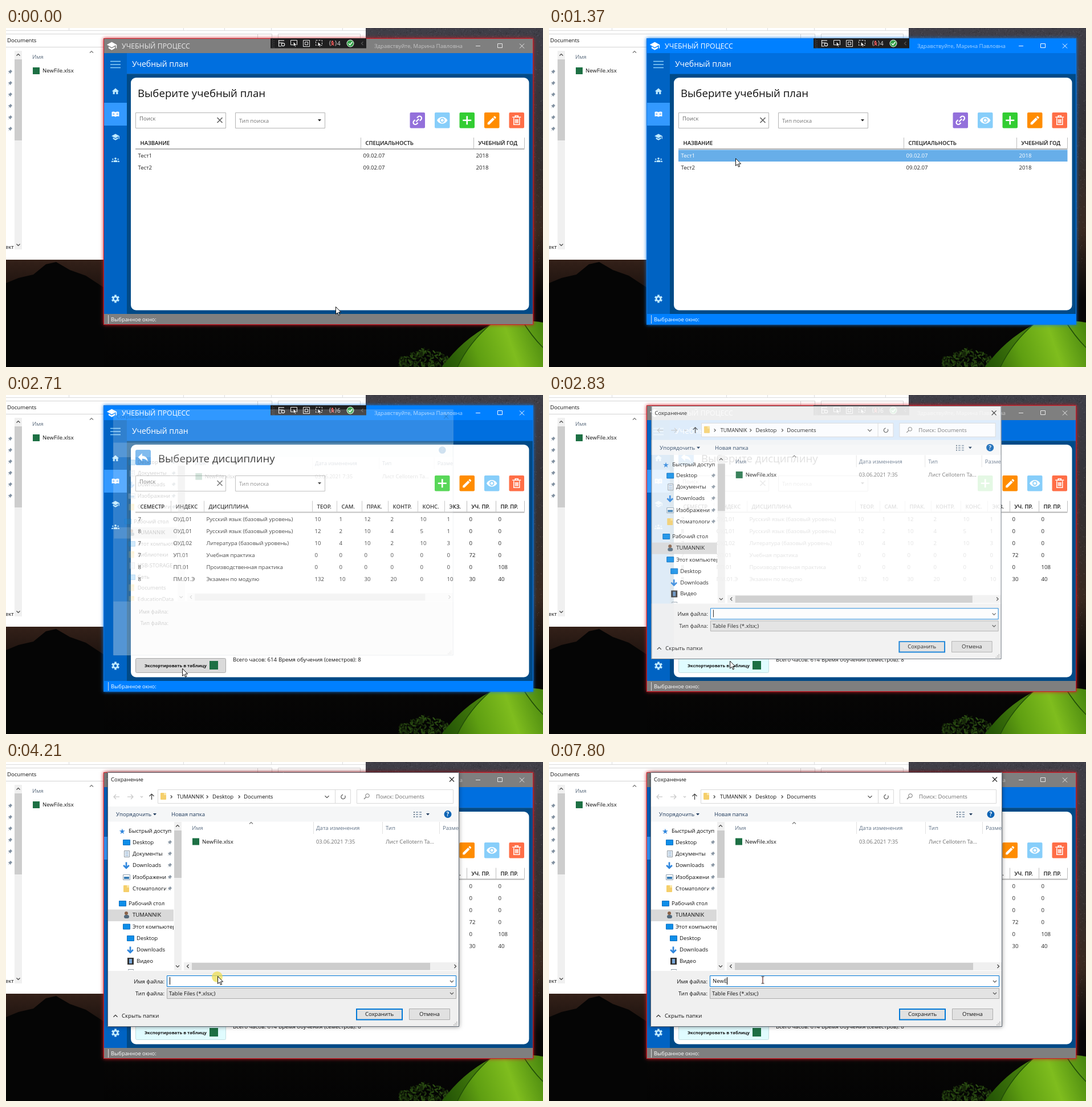
Write an HTML page with a canvas that moves like this. It is 942 px wide and 594 px high and loops after 8 s.

```html
<!DOCTYPE html>
<html lang="ru">
<head>
<meta charset="utf-8">
<style>
html, body { margin: 0; width: 100%; height: 100%; overflow: hidden; background: #050505; }
canvas { display: block; }
</style>
</head>
<body>
<canvas id="stage" width="942" height="594"></canvas>
<script>
const g = document.getElementById('stage').getContext('2d');
const LOOP = 8000, UI = 9.6, INK = '#111';
const FONT = '"Open Sans", "Noto Sans", sans-serif';

// ---------- helpers ----------
function rect(x, y, w, h, fill, stroke, r = 0, lw = 1) {
  g.beginPath();
  g.roundRect(x, y, w, h, r);
  if (fill) { g.fillStyle = fill; g.fill(); }
  if (stroke) { g.strokeStyle = stroke; g.lineWidth = lw; g.stroke(); }
}
function line(color, lw, ...p) {
  g.beginPath();
  for (let i = 0; i < p.length; i += 2) g.lineTo(p[i], p[i + 1]);
  g.strokeStyle = color; g.lineWidth = lw; g.stroke();
}
function disc(x, y, r, color) {
  g.beginPath(); g.arc(x, y, r, 0, 7); g.fillStyle = color; g.fill();
}
// y is the middle of the capitals
function text(s, x, y, color = INK, size = UI, weight = 400, align = 'left') {
  g.font = `${weight} ${size}px ${FONT}`;
  g.textAlign = align; g.fillStyle = color;
  g.fillText(s, x, Math.round(y + size * .36));
}
function icon(d, x, y, size, color, lw) {
  g.save();
  g.translate(x - size / 2, y - size / 2);
  g.scale(size / 24, size / 24);
  const p = new Path2D(d);
  if (lw) { g.strokeStyle = color; g.lineWidth = lw; g.stroke(p); }
  else { g.fillStyle = color; g.fill(p, 'evenodd'); }
  g.restore();
}
function chevron(x, y, dir, color = '#444', s = 3, lw = 1.2) {
  g.save(); g.translate(x, y); g.rotate(dir * Math.PI / 2);
  line(color, lw, -s, -s / 2, 0, s / 2, s, -s / 2);
  g.restore();
}
const DOWN = 0, LEFT = 1, UP = 2, RIGHT = 3;
function caretDown(x, y, color) {
  g.beginPath(); g.moveTo(x - 3, y - 1.5); g.lineTo(x + 3, y - 1.5); g.lineTo(x, y + 2);
  g.fillStyle = color; g.fill();
}
function cross(x, y, s, color, lw) {
  line(color, lw, x - s, y - s, x + s, y + s);
  line(color, lw, x - s, y + s, x + s, y - s);
}
function clip(x, y, w, h, draw) {
  g.save(); g.beginPath(); g.rect(x, y, w, h); g.clip(); draw(); g.restore();
}
function glow(color, blur, draw) {
  g.save(); g.shadowColor = color; g.shadowBlur = blur; draw(); g.restore();
}
function random(seed) {
  return () => (seed = (seed * 16807) % 2147483647) / 2147483647;
}
function gradient(x0, y0, x1, y1, ...colors) {
  const q = g.createLinearGradient(x0, y0, x1, y1);
  colors.forEach((c, i) => q.addColorStop(i / (colors.length - 1), c));
  return q;
}

const ICON = {
  cap: 'M12 3L1 9l11 6 9-4.9V17h2V9zM5 13.2v4L12 21l7-3.8v-4L12 17z',
  home: 'M10 20v-6h4v6h5v-8h3L12 3 2 12h3v8z',
  book: 'M1 5q6-2 11 1 5-3 11-1v14q-6-2-11 1-5-3-11-1zM11.3 8v9M4 8.5h5v1.5H4zM4 12h5v1.5H4zM15 8.5h5v1.5h-5zM15 12h5v1.5h-5z',
  people: 'M9 8a3 3 0 1 0 6 0 3 3 0 1 0-6 0M2 10a2 2 0 1 0 4 0 2 2 0 1 0-4 0M18 10a2 2 0 1 0 4 0 2 2 0 1 0-4 0M6 19v-2q0-4 6-4t6 4v2zM0 19v-2q0-3 4.5-3v5zM24 19v-2q0-3-4.5-3v5z',
  pencil: 'M3 17.2V21h3.8L17.8 9.9l-3.7-3.7zM20.7 7a1 1 0 0 0 0-1.4l-2.3-2.3a1 1 0 0 0-1.4 0l-1.9 1.8 3.8 3.8z',
  eye: 'M12 5C7 5 2.7 8 1 12c1.7 4 6 7 11 7s9.3-3 11-7c-1.7-4-6-7-11-7zM12 17a5 5 0 1 1 0-10 5 5 0 0 1 0 10zM12 15a3 3 0 1 0 0-6 3 3 0 0 0 0 6z',
  trash: 'M6 7v14h12V7M3 5.5h18M9 5V2.5h6V5M9.5 9.5v8.5M12 9.5v8.5M14.5 9.5v8.5',
  link: 'M9 15l6-6M11 7l2.5-2.5a4.2 4.2 0 0 1 6 6L17 13M13 17l-2.5 2.5a4.2 4.2 0 0 1-6-6L7 11',
  plus: 'M12 3v18M3 12h18',
  reply: 'M10 9V4l-8 8 8 8v-5c5 0 9 1.5 12 6-1-6-4-12-12-12z',
  arrow: 'M12 2v19M3 12l9 9 9-9',
  pin: 'M14 2l8 8-2 1-4 4-1 5-5-5-7 7 6-8-5-5 5-1 4-4z'
};

// ---------- desktop ----------
function desktop() {
  rect(0, 0, 942, 594, gradient(0, 0, 0, 594, '#403f48', '#36343a', '#352f2d', '#3a291f', '#080706', '#040404'));
  const rnd = random(71);
  for (let i = 0; i < 900; i++) {
    const side = i % 3;
    g.fillStyle = rnd() < .5 ? `rgba(190,185,200,${rnd() * .3})` : `rgba(0,0,0,${rnd() * .4})`;
    g.fillRect(side ? 632 + rnd() * 310 : 925 + rnd() * 17, side ? rnd() * 18 : rnd() * 420, 1, 1);
  }
  rect(0, 400, 172, 90, gradient(0, 400, 0, 460, '#36221a', '#1c120e'));
  g.fillStyle = '#050505';
  g.beginPath();
  for (const [x, y] of [[0, 447], [22, 438], [48, 432], [70, 414], [88, 410], [112, 424], [140, 434], [172, 455], [172, 594], [0, 594]]) g.lineTo(x, y);
  g.fill();
  for (let i = 0; i < 170; i++) {
    const x = 690 + rnd() * 85, low = 560 + Math.abs(x - 738) * .4;
    g.fillStyle = `hsl(95 60% ${5 + rnd() * 15}%)`;
    g.beginPath();
    g.ellipse(x, low + rnd() * (594 - low), 3.5, 1.3, rnd() * 3, 0, 7);
    g.fill();
  }
  const tent = new Path2D('M765 594Q800 546 850 520Q890 508 942 516V594Z');
  g.fillStyle = gradient(770, 590, 942, 530, '#2f6308', '#5f9f12', '#7fbd1e', '#4a880f');
  g.fill(tent);
  g.fillStyle = 'rgba(18,60,4,.4)';
  g.fill(new Path2D('M765 594Q800 546 850 520Q812 552 792 594Z'));
  g.lineWidth = 1.5; g.strokeStyle = '#214d08';
  g.stroke(new Path2D('M792 594Q812 552 850 519M905 512Q922 540 942 560'));
}

const tableFile = (x, y) => rect(x, y - 6, 12, 12, '#1d7044');

function explorer() {
  rect(0, 0, 631, 406, '#fff');
  line('#dcdcdc', 1, 0, 4.5, 631, 4.5);
  for (const x of [110, 311, 383, 465, 590]) line('#ddd', 1, x + .5, 0, x + .5, 4);
  line('#d4d4d4', 1, 0, 10.5, 466.5, 10.5, 466.5, 20);
  line('#d4d4d4', 1, 441.5, 10, 441.5, 20);
  line('#d4d4d4', 1, 477.5, 20, 477.5, 10.5, 621.5, 10.5, 621.5, 20);
  line('#d4d4d4', 1, 0, 33.5, 171, 33.5);
  text('Documents', 2, 22);
  rect(15, 40, 13, 348, '#f0f0f0');
  rect(15, 55, 13, 142, '#cdcdcd');
  chevron(21.5, 47, UP); chevron(21.5, 380, DOWN);
  for (let y = 77; y < 180; y += 20) icon(ICON.pin, 7, y, 10, '#8291a1');
  text('ект', -1, 384);
  text('Имя', 46, 51, '#5b6b7d');
  chevron(150, 42, UP, '#777');
  tableFile(47, 75);
  text('NewFile.xlsx', 64, 75);
}

// ---------- application ----------
function debugBar(count) {
  rect(464, 18, 168, 17.5, '#1f1f20');
  for (let y = 21; y < 34; y += 3) { disc(467.5, y, .6, '#777'); disc(470, y + 1.5, .6, '#777'); }
  const w = '#e8e8e8';
  line(w, 1.2, 478, 22, 488, 22); line(w, 1.2, 478, 26, 485, 26);
  line(w, 1.2, 478.5, 21, 478.5, 32, 483, 32);
  g.beginPath(); g.arc(486, 29, 2.7, 0, 7); g.stroke();
  rect(499.5, 21.5, 11, 8, null, w); arrowCursor(504, 24, .6);
  rect(521.5, 21.5, 11, 11, null, w); rect(524.5, 24.5, 5, 5, null, w);
  g.setLineDash([3, 2]); rect(543.5, 21.5, 11, 9, null, w); g.setLineDash([]);
  arrowCursor(547, 24, .6);
  text('(', 567, 26, w, 10); text(')', 577, 26, w, 10);
  disc(572.5, 24, 1.7, '#ee5a5a'); cross(573, 28, 2.5, '#ee5a5a', 1.5);
  text(count, 581, 27, w, 10);
  disc(604, 27, 6.5, '#dff3df'); disc(604, 27, 5.5, '#35a14a');
  line('#fff', 1.5, 601, 27, 603.3, 29.5, 607.5, 24.5);
  chevron(625, 27, LEFT, '#555');
}

function gear(x, y, color) {
  g.save(); g.translate(x, y); g.fillStyle = color;
  for (let i = 0; i < 6; i++) { g.rotate(Math.PI / 3); g.fillRect(-1.8, -7, 3.6, 5); }
  g.restore();
  g.beginPath(); g.arc(x, y, 3.7, 0, 7); g.strokeStyle = color; g.lineWidth = 2.8; g.stroke();
  disc(x, y, 2.3, '#0063c3');
}

function tool(i, y, color, name, lw) {
  const x = 708.5 + i * 43.5;
  rect(x, y, 26.5, 27.5, color, null, 2);
  icon(ICON[name], x + 13.25, y + 13.75, 20, '#fff', lw);
}

function searchRow(y) {
  rect(227.5, y + .5, 158, 27, '#fff', '#b4b4b4');
  text('Поиск', 234, y + 11, '#666');
  cross(375, y + 13.5, 4.5, '#666', 1.7);
  rect(402.5, y + .5, 157, 27, '#fff', '#b4b4b4');
  text('Тип поиска', 409, y + 14.5, '#777');
  caretDown(550, y + 13.5, '#222');
}

const SELECTED = '#67aee9', HOVER = '#cfe6fa';
function table(y, edges, heads, rows, marks = {}) {
  heads.forEach((h, i) => text(h, edges[i] + 8.5, y, '#111', 9.5, 600));
  edges.forEach((x, i) => i && line('#bdbdbd', 1, x + .5, y - 10, x + .5, y + 9));
  line('#b5b5b5', 2, 227, y + 10, 909.5, y + 10);
  rows.forEach((row, r) => {
    const cy = y + 22 + r * 21;
    if (marks[r]) rect(227, cy - 10.5, 682.5, 20.5, marks[r]);
    row.split('|').forEach((c, i) => text(c, edges[i] + 4.5, cy, marks[r] === SELECTED ? '#fff' : '#222'));
  });
}

function plansView(t) {
  text('Выберите учебный план', 231, 114.5, '#111', 18.6);
  searchRow(148);
  tool(0, 148, '#9370db', 'link', 2.6);
  tool(1, 148, '#87cefa', 'eye');
  tool(2, 148, '#32cd32', 'plus', 3.2);
  tool(3, 148, '#ff8c00', 'pencil');
  tool(4, 148, '#ff6e47', 'trash', 1.8);
  const marks = {};
  if (t >= 1100) marks[0] = SELECTED;
  else if (t >= 910) marks[0] = HOVER;
  else if (t >= 790) marks[1] = HOVER;
  table(202, [227, 622, 820, 909], ['НАЗВАНИЕ', 'СПЕЦИАЛЬНОСТЬ', 'УЧЕБНЫЙ ГОД'],
    ['Тест1|09.02.07|2018', 'Тест2|09.02.07|2018'], marks);
}

const EDGES = [227, 289, 347, 537, 580, 624, 670, 722, 769, 808, 859, 909];
const HEADS = 'СЕМЕСТР|ИНДЕКС|ДИСЦИПЛИНА|ТЕОР.|САМ.|ПРАК.|КОНТР.|КОНС.|ЭКЗ.|УЧ. ПР.|ПР. ПР.'.split('|');
const SUBJECTS = [
  '7|ОУД.01|Русский язык (базовый уровень)|10|1|12|2|10|1|0|0',
  '8|ОУД.01|Русский язык (базовый уровень)|12|2|10|4|5|1|0|0',
  '7|ОУД.02|Литература (базовый уровень)|10|4|10|2|10|3|0|0',
  '7|УП.01|Учебная практика|0|0|0|0|0|0|72|0',
  '8|ПП.01|Производственная практика|0|0|0|0|0|0|0|108',
  '8|ПМ.01.Э|Экзамен по модулю|132|10|30|20|0|10|30|40'
];
function subjectsView(t) {
  rect(227, 96, 27, 27, '#4298e6', null, 3);
  icon(ICON.reply, 240.5, 109, 21, '#fff');
  text('Выберите дисциплину', 267, 111, '#111', 18.6);
  searchRow(141);
  tool(1, 141, '#32cd32', 'plus', 3.2);
  tool(2, 141, '#ff8c00', 'pencil');
  tool(3, 141, '#87cefa', 'eye');
  tool(4, 141, '#ff6e47', 'trash', 1.8);
  table(195.5, EDGES, HEADS, SUBJECTS);
  const over = t > 2180 && t < 2790;
  const fill = !over ? '#e0fcff' : t > 2430 && t < 2490 ? '#c6c6c6' : '#dadada';
  rect(227.5, 461.5, 158, 25, fill, over ? '#aaa' : '#c4dfe2', 2);
  text('Экспортировать в таблицу', 243, 474, '#111', 7.7, 700);
  rect(357, 466, 15, 15, '#1d7044');
  text('Всего часов: 614', 398, 464);
  text('Время обучения (семестров): 8', 478, 464);
}

function app(t) {
  const active = t >= 1100 && t < 2770, second = t >= 1960;
  const bar = active ? '#0080ff' : '#7f7f7f';
  const edge = active ? '#0f78e4' : '#d01c26';
  glow(edge, 6, () => rect(171, 18, 754, 502, bar));
  rect(171, 44, 41, 457, '#0063c3');
  rect(212, 44, 713, 36.5, '#006fdf');
  rect(212, 80.5, 713, 420.5, '#004a87');
  rect(219, 87, 698.5, 407.5, '#fff', null, 9);
  const pale = '#bfeaff', title = active ? '#fff' : '#e9e9e9';
  icon(ICON.cap, 185.5, 31.5, 19, '#fff');
  text('УЧЕБНЫЙ ПРОЦЕСС', 203, 31.5, title, 12.3);
  text('Здравствуйте, Марина Павловна', 801, 32, active ? '#a5d2ff' : '#c4c4c4', 9.7, 400, 'right');
  line(title, 1, 824, 31.5, 832, 31.5);
  rect(862.5, 27.5, 8, 7, null, title);
  cross(905, 31.5, 4, title, 1);
  rect(171, 131, 41, 40, '#3399ff');
  for (const y of [58.5, 64, 69.5]) line('#8fd0fa', 1.5, 183, y, 201, y);
  icon(ICON.home, 192, 111, 15, pale);
  icon(ICON.book, 192, 151, 14, '#fff');
  icon(ICON.cap, 192, 191, 15, pale);
  icon(ICON.people, 192, 231, 14, pale);
  gear(192, 474.5, pale);
  text('Учебный план', 221, 63, '#fff', 14);
  line('#ddd', 1, 179.5, 503, 179.5, 518);
  text('Выбранное окно:', 184, 511, '#fff', 9.4);
  rect(171.5, 18.5, 753, 501, null, edge);
  (second ? subjectsView : plansView)(t);
  debugBar(second ? '6' : '4');
}

// ---------- save dialog ----------
const folder = (x, y) => { rect(x, y - 6, 10, 12, '#f5cf6b', null, 1); rect(x + 6, y - 6, 4, 4, '#fbe6a6'); };
const screen = (x, y) => rect(x + .5, y - 4.5, 12, 9, '#0d8ee9', '#0a6fc0');
const TREE = [
  ['Быстрый доступ', 215, 121, 'star'], ['Desktop', 222, 141, 'screen', 1], ['Документы', 222, 161, 'page', 1],
  ['Downloads', 222, 181, 'down', 1], ['Изображени', 222, 202, 'image', 1], ['Стоматологи', 222, 222, 'folder', 1],
  ['Рабочий стол', 215, 248, 'screen'], ['TUMANNIK', 222, 268, 'user'], ['Этот компьютер', 222, 288.5, 'screen']
];
const TAIL = [['Desktop', 229, 309, 'screen'], ['Downloads', 229, 329, 'down'], ['Видео', 229, 349, 'film'], ['', 229, 369, 'page']];
const EARLY_TAIL = [['Библиотеки', 222, 308, 'folder'], ['USB-STORAGE', 222, 328, 'page'], ['Сеть', 222, 349, 'screen'],
  ['Documents', 222, 368, 'folder'], ['EducationData', 222, 389, 'folder']];

function treeIcon(kind, x, y) {
  if (kind === 'screen') screen(x, y);
  if (kind === 'folder') folder(x + 1, y);
  if (kind === 'down') icon(ICON.arrow, x + 6, y, 13, '#2f86dd', 5);
  if (kind === 'star') text('★', x, y, '#2f86dd', 13);
  if (kind === 'user') { disc(x + 6, y - 3, 3, '#8a6248'); rect(x + 2, y, 9, 6, '#52697c', null, 3); }
  if (kind === 'film') { rect(x + 1, y - 6, 11, 12, '#333'); rect(x + 4, y - 4, 5, 8, '#79a7d8'); }
  if (kind === 'image') { rect(x + .5, y - 4.5, 12, 9, '#fff', '#8ea0b0'); rect(x + 2, y - 1, 9, 4, '#387cb4'); }
  if (kind === 'page') {
    rect(x + 2.5, y - 5.5, 9, 11, '#fff', '#8995a0');
    for (let k = -3; k < 5; k += 3) line('#5f8fbe', 1, x + 4, y + k, x + 10, y + k);
  }
}

function tree(early) {
  clip(179, 105, 115, 260, () => {
    g.translate(0, early ? -27 : 0);
    rect(179, 258.5, 115, 20.5, '#d9d9d9');
    for (const [s, x, y, kind, pinned] of TREE.concat(early ? EARLY_TAIL : TAIL)) {
      treeIcon(kind, x - 17, y);
      text(s, x, y);
      if (pinned) { rect(281, y - 8, 13, 16, '#fff'); icon(ICON.pin, 287, y, 10, '#8b98a5'); }
    }
  });
  rect(295, 105, 13, 260, '#f0f0f0');
  rect(295, 120, 13, 83, '#cdcdcd');
  chevron(301, 112, UP); chevron(301, 358, DOWN);
}

function addressBar() {
  line('#c6c6c6', 1.2, 199, 61, 189, 61); chevron(191, 61, LEFT, '#c6c6c6', 4);
  line('#c6c6c6', 1.2, 213, 61, 223, 61); chevron(221, 61, RIGHT, '#c6c6c6', 4);
  chevron(238, 61, DOWN, '#c6c6c6', 2);
  line('#444', 1.3, 255.5, 66, 255.5, 56); chevron(255.5, 58, UP, '#444', 4);
  rect(266.5, 48.5, 338, 24, '#fff', '#d9d9d9');
  line('#d9d9d9', 1, 577.5, 48, 577.5, 73);
  folder(271, 60);
  [290, 353, 409].forEach(x => chevron(x, 61, RIGHT, '#444', 2.5));
  text('TUMANNIK', 300, 60.5, INK, 9);
  text('Desktop', 362, 60.5); text('Documents', 417, 60.5);
  chevron(563, 61, DOWN, '#555', 3.5);
  g.beginPath(); g.arc(591.5, 61, 3.7, -.6, 4.6); g.strokeStyle = '#555'; g.lineWidth = 1.2; g.stroke();
  rect(615.5, 48.5, 169, 24, '#fff', '#d9d9d9');
  g.beginPath(); g.arc(634, 59, 3.3, 0, 7); g.strokeStyle = '#777'; g.stroke();
  line('#777', 1.2, 631.5, 61.5, 628, 65);
  text('Поиск: Documents', 649, 60.5, '#6d6d6d');
}

function grip(x, y) {
  for (let i = 0; i < 3; i++) for (let j = 0; j <= i; j++) rect(x - j * 2.5, y - (2 - i) * 2.5, 1.5, 1.5, '#aaa');
}

function typed(t) {
  const keys = [5720, 6380, 6650, 7200];
  return 'NewE'.slice(0, keys.filter(k => t >= k).length);
}

function fields(t) {
  rect(282.5, 374.5, 507, 19, '#fff', '#0078d7');
  chevron(782, 384.5, DOWN, '#555');
  rect(282.5, 396.5, 507, 18, '#e3e3e3', '#adadad');
  text('Table Files (*.xlsx;)', 286, 405.5);
  chevron(782, 405.5, DOWN, '#555');
  const s = typed(t);
  text(s, 287, 384);
  const x = Math.round(287 + (s ? g.measureText(s).width : 0)) + .5;
  if (t < 7310 || t >= 7800) line('#000', 1, x, 377, x, 390);
}

function dialog(t) {
  const p = Math.min(1, (t - 2650) / 200), early = t < 2770, head = '#5f7186';
  const scale = .952 + .048 * p, body = () => rect(178, 18, 617, 445.5, '#fff');
  g.save();
  g.globalAlpha = p ** 1.4;
  g.translate(486.5, 240.5);
  g.scale(scale, scale);
  g.translate(-486.5, -240.5);
  if (p < 1) body(); else glow('rgba(0,0,0,.45)', 7, body);
  rect(178, 78, 617, 26.5, '#f5f6f7');
  rect(178, 366, 617, 97.5, '#f0f0f0');
  text('Сохранение', 184, 31);
  cross(782, 30.5, 4, '#222', 1.1);
  if (!early) {
    addressBar();
    text('Упорядочить', 193, 91.5, '#1e395b'); caretDown(261, 91.5, '#1e395b');
    text('Новая папка', 290, 91.5, '#1e395b');
    for (let y = 87; y < 97; y += 4) {
      rect(715, y, 2, 2, '#678'); rect(719, y, 4, 2, '#9ab'); rect(725, y, 4, 2, '#9ab');
    }
    caretDown(740, 91.5, '#1e395b');
  }
  disc(775, 91.5, 6.5, '#0c63b4');
  text('?', 775, 91.5, '#fff', 10, 700, 'center');
  tree(early);
  chevron(430, 107, UP, '#777');
  text('Имя', 326, 115.5, head);
  text('Дата изменения', 544, 115.5, head);
  text('Тип', 666, 115.5, head);
  clip(760, 105, 34, 30, () => text('Разме', 766, 115.5, head));
  for (const x of [539.5, 660.5, 760.5]) line('#e2e2e2', 1, x, 105, x, 126);
  tableFile(327, 139.5);
  text('NewFile.xlsx', 344, 140);
  text('03.06.2021 7:35', 544, 140, '#6d6d6d', 9.3);
  text('Лист Cellotern Ta...', 666, 140, '#6d6d6d');
  rect(312, 351, 482, 14, '#f0f0f0');
  rect(326, 352, 418, 12.5, '#cdcdcd');
  chevron(319, 358, LEFT); chevron(788, 358, RIGHT);
  text('Имя файла:', 278, 384.5, INK, UI, 400, 'right');
  text('Тип файла:', 278, 405.5, INK, UI, 400, 'right');
  if (!early) {
    fields(t);
    chevron(192, 445, UP, '#333', 3.5);
    text('Скрыть папки', 203, 445);
    rect(615, 433, 80, 18.5, '#e1e1e1', '#0078d7', 0, 2);
    rect(707.5, 432.5, 71, 19, '#e1e1e1', '#adadad');
    text('Сохранить', 655, 442, INK, UI, 400, 'center');
    text('Отмена', 743, 442, INK, UI, 400, 'center');
  }
  grip(790, 460);
  rect(178.5, 18.5, 616, 445, null, early ? '#a8b4c0' : '#5d6670');
  g.restore();
  if (t >= 6210 && t < 7200) {
    rect(288, 394, 488, 33, 'rgba(0,0,0,.35)');
    rect(285.5, 391.5, 488, 33, '#fff', '#6a6a6a');
    text('NewFile.xlsx', 290, 401);
    grip(769, 420);
  }
}

// ---------- pointer ----------
const PATH = [
  [50, 578, 488], [860, 328, 238], [910, 328, 238], [1010, 327, 228], [1840, 327, 228],
  [2200, 309, 479], [2700, 309, 479], [2950, 324, 454], [3420, 352, 394], [3480, 352, 394],
  [3650, 372, 351], [3820, 370, 391], [4040, 370, 391], [4200, 371, 375], [4260, 371, 375],
  [4450, 360, 381], [4600, 360, 381], [4670, 375, 382], [LOOP, 375, 382]
];
const CLICKS = [1040, 1850, 2430, 4150];

function pointerAt(t) {
  let a = PATH[0];
  for (const b of PATH) {
    if (t < b[0]) {
      const u = Math.max(0, (t - a[0]) / (b[0] - a[0] || 1)), e = u * u * (3 - 2 * u);
      return [a[1] + (b[1] - a[1]) * e, a[2] + (b[2] - a[2]) * e];
    }
    a = b;
  }
  return a.slice(1);
}
function arrowCursor(x, y, s = 1) {
  g.save(); g.translate(x, y); g.scale(s, s);
  const p = new Path2D('M.5 .5V13.5L3.5 10.8 5.6 15.4 7.6 14.5 5.5 10H9.6Z');
  g.fillStyle = '#fff'; g.fill(p);
  g.strokeStyle = '#111'; g.lineWidth = 1; g.stroke(p);
  g.restore();
}
function pointer(t) {
  const [x, y] = pointerAt(t);
  for (const c of CLICKS) {
    const age = (t - c) / 260;
    if (age >= 0 && age < 1) disc(x - .5, y + 1.5, 9.5, `rgba(238,222,84,${.75 * Math.min(1, 2 - 2 * age)})`);
  }
  if (t < 4610) return arrowCursor(x, y);
  line('#5a2020', 1.2, x, y - 6, x, y + 6);
  line('#333', 1, x - 2.5, y - 6, x + 2.5, y - 6);
  line('#333', 1, x - 2.5, y + 6, x + 2.5, y + 6);
}

function frame(now) {
  const t = now % LOOP;
  desktop();
  explorer();
  app(t);
  if (t >= 2650) dialog(t);
  pointer(t);
  requestAnimationFrame(frame);
}
requestAnimationFrame(frame);
</script>
</body>
</html>
```
